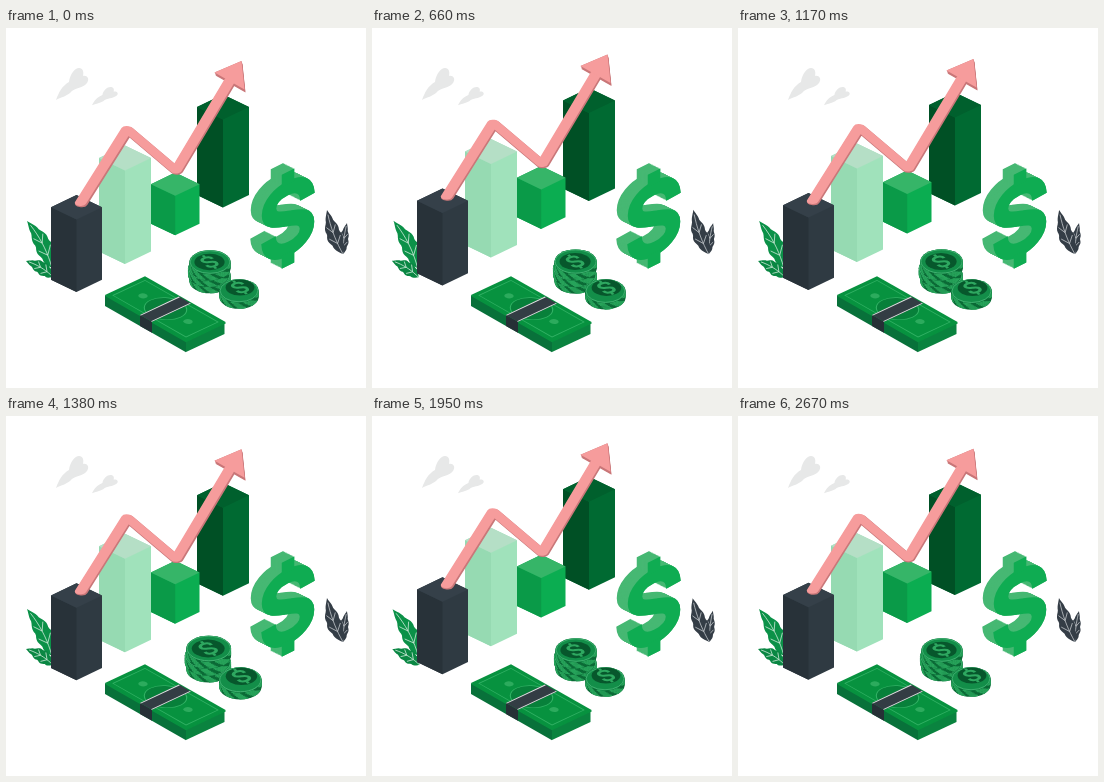
Animation of 360 by 360 pixels, one loop 2700 ms. Source, as an HTML page with a canvas:

```html
<!DOCTYPE html>
<html lang="en">
<head>
<meta charset="utf-8">
<title>Growth chart</title>
<style>
html, body { margin: 0; width: 100%; height: 100%; overflow: hidden; background: #fff; }
canvas { display: block; width: 360px; height: 360px; }
</style>
</head>
<body>
<canvas id="stage" width="360" height="360"></canvas>
<script>
const ctx = document.getElementById('stage').getContext('2d');
const LOOP = 2700, STEP = 30, TAU = Math.PI * 2;

// ---- drawing helpers ----
function fill(color, path) {
  ctx.fillStyle = color;
  ctx.fill(path);
}
function line(color, width, path) {
  ctx.strokeStyle = color;
  ctx.lineWidth = width;
  ctx.stroke(path);
}
function ellipse(x, y, rx, ry = rx, end = TAU) {
  const path = new Path2D();
  path.ellipse(x, y, rx, ry, 0, 0, end);
  return path;
}
function saved(change, draw) {
  ctx.save();
  change();
  draw();
  ctx.restore();
}
function around(x, y, change, draw) {
  saved(() => { ctx.translate(x, y); change(); ctx.translate(-x, -y); }, draw);
}
// Repeats a drawing along a vector, ending at the origin, to give it depth.
function extrude(dx, dy, draw) {
  const steps = Math.ceil(Math.hypot(dx, dy));
  for (let i = steps; i >= 0; i--)
    saved(() => ctx.translate(dx * i / steps, dy * i / steps), draw);
}

// ---- motion ----
const triangle = p => 1 - Math.abs(2 * (p % 1) - 1);
const floatOffset = t => 0.3 - 7.2 * triangle((t - 30 + LOOP) / 1350);
// Two beats per loop: a quick swell, then a fall.
const pulse = (p, peak, end) => Math.max(0, Math.min(1 - (peak - p) / .1, 1 - (p - peak) / (end - peak)));
const beatScale = p => 1 + .1 * (pulse(p, .1, .3) + pulse(p, .5, .6));
const swayAngle = p => (2 * triangle(p + .25) - 1) * Math.PI / 180;

// ---- clouds and plants ----
const CLOUD = new Path2D('M0 32 C3 24 6 18 13 14 C14 6 19 0 23 0 C27 0 28 4 27 8 C31 7 34 11 31 15 C26 21 19 19 14 25 C9 29 5 29 0 32Z');

function cloud(x, y, sx, sy) {
  saved(() => { ctx.translate(x, y); ctx.scale(sx, sy); }, () => fill('#e7e8e8', CLOUD));
}

function leaf(color, veinColor, bx, by, tx, ty, width, bend) {
  const dx = tx - bx, dy = ty - by, len = Math.hypot(dx, dy);
  const at = (u, side) => {
    const lobe = .8 + .2 * Math.abs(Math.sin(u * Math.PI * 4));
    const off = bend * 4 * u * (1 - u) + side * width * lobe * Math.sin(Math.PI * u ** .8);
    return [bx + dx * u - dy / len * off, by + dy * u + dx / len * off];
  };
  const outline = new Path2D(), veins = new Path2D();
  for (let u = 0; u <= 1; u += .04) outline.lineTo(...at(u, 1));
  for (let u = 1; u >= 0; u -= .04) outline.lineTo(...at(u, -1));
  for (let u = 0; u < .9; u += .1) veins.lineTo(...at(u, 0));
  for (const u of [.25, .5]) {
    veins.moveTo(...at(u, 0));
    veins.lineTo(...at(u + .15, -.75));
    veins.moveTo(...at(u, 0));
    veins.lineTo(...at(u + .15, .75));
  }
  fill(color, outline);
  line(veinColor, .8, veins);
}

function leftPlant() {
  leaf('#0b9148', '#cfeada', 46, 240, 21, 193, 9, 3);
  leaf('#0a8743', '#cfeada', 47, 249, 20, 233, 7, 2);
}
function rightPlant() {
  leaf('#343d46', '#c3c7cb', 337, 226, 341, 195, 5, -1);
  leaf('#343d46', '#c3c7cb', 337, 226, 321, 182, 8, -2);
}

// ---- chart ----
// Block centred on x: the silhouette first, so the faces join without gaps.
function bar(x, half, top, height, [left, right, lid]) {
  const drop = half * .48, side = top + drop, front = side + drop;
  fill(right, new Path2D(`M${x - half} ${side} L${x} ${top} L${x + half} ${side} v${height} L${x} ${front + height} L${x - half} ${side + height}Z`));
  fill(left, new Path2D(`M${x - half} ${side} L${x} ${front} v${height} L${x - half} ${side + height}Z`));
  fill(lid, new Path2D(`M${x - half} ${side} L${x} ${top} L${x + half} ${side} L${x} ${front}Z`));
}

const TREND = new Path2D('M74.5 350 L121 202 L170 285 L224 104');
const HEAD = new Path2D('M235.5 33 L208.5 44.5 L238.5 61.5Z');

function trendLine(color, width, dx, dy) {
  saved(() => { ctx.translate(dx, dy); ctx.scale(1, .5); ctx.lineJoin = ctx.lineCap = 'round'; },
    () => line(color, width, TREND));
}

function chart() {
  bar(217, 26, 66.5, 88, ['#005025', '#006a32', '#00602d']);
  bar(169.2, 24.3, 144.5, 39.5, ['#0a9a48', '#0bad51', '#36b568']);
  bar(119, 26, 117.5, 93.5, ['#96dab2', '#a0e2bb', '#b5dfc6']);
  bar(70.5, 25.5, 167, 72.5, ['#283239', '#2f3a42', '#354049']);

  const pink = '#f69c9c', shade = '#c97779';
  trendLine(shade, 12.5, .8, 1);
  extrude(1, 3, () => fill(shade, HEAD));
  trendLine(pink, 11.5, 0, 0);
  fill(pink, HEAD);
}

// ---- dollar sign ----
const DOLLAR = new Path2D('M19.5 -12 C19 -24 11 -30.5 0 -30.5 C-11 -30.5 -19 -25 -19 -16 C-19 -6 -9 -3 0 0 C9 3 19 6 19 16 C19 25 11 30.5 0 30.5 C-11 30.5 -19 24 -19.5 12');
const STUBS = new Path2D('M0 -47 V-34 M0 34 V47');

function dollarFace(color) {
  saved(() => ctx.transform(1, -.5, 0, 1, 282, 190.5), () => {
    line(color, 14.5, DOLLAR);
    line(color, 12.5, STUBS);
  });
}
function dollar() {
  extrude(-11, -5.5, () => dollarFace('#46b873'));
  dollarFace('#0fac52');
}

// ---- money ----
function money() {
  const w = 40, l = 81, depth = 11;
  const onNote = draw => saved(() => ctx.transform(1, -.47, 1, .57, 99, 267), draw);
  const rect = (color, ...box) => { ctx.fillStyle = color; ctx.fillRect(...box); };
  const leftSide = (color, from, to) => saved(() => ctx.transform(1, .57, 0, 1, 99, 267),
    () => rect(color, from, 0, to - from, depth));

  leftSide('#08713a', 0, l);
  saved(() => ctx.transform(1, -.47, 0, 1, 180, 313), () => rect('#0a833f', 0, 0, 38.5, depth));
  extrude(0, 1, () => onNote(() => rect('#07923f', 0, 0, w, l)));
  onNote(() => {
    ctx.strokeStyle = '#32b265';
    ctx.lineWidth = .8;
    ctx.strokeRect(4, 4, w - 8, l - 8);
    const seal = ellipse(w / 2, l / 2, 15);
    fill('#07803a', seal);
    line('#32b265', .8, seal);
    for (const v of [18, l - 18]) fill('#2cab5d', ellipse(w / 2, v, 3.3));
  });
  leftSide('#263036', 35, 47);
  onNote(() => {
    rect('#333d44', 0, 35, w - 1, 12);
    for (const v of [35, 46]) rect('#dfe6e2', 0, v, w - 1, .9);
  });
}

// ---- coins ----
function coin(x, y, rx, ry, depth) {
  extrude(0, depth, () => fill('#0b6a36', ellipse(x, y, rx, ry)));
  saved(() => ctx.setLineDash([8, 5]), () => {
    for (let i = 1; i < depth; i++) {
      ctx.lineDashOffset = i * 1.5;
      line('#27a35a', 1.2, ellipse(x, y + i, rx - .5, ry, Math.PI));
    }
  });
  fill('#138e49', ellipse(x, y, rx, ry));
  line('#4ab778', .8, ellipse(x, y, rx - .6, ry - .5));
}

function stack(x, y, rx, ry, count) {
  const depth = 6.5;
  for (let i = count - 1; i >= 0; i--) coin(x + (i % 2 ? -1 : .5), y + i * depth, rx - .5, ry, depth);
  fill('#07572c', ellipse(x, y, rx * .72, ry * .7));
  saved(() => { ctx.translate(x, y); ctx.transform(.24, -.08, .14, .14, 0, 0); }, () => {
    line('#2ea860', 12, DOLLAR);
    line('#2ea860', 10, STUBS);
  });
}

function coins() {
  stack(203.5, 234, 21, 11.8, 3);
  stack(234, 259.5, 20, 11.5, 1.5);
}

// ---- scene ----
function render(t) {
  const p = t / LOOP;
  const sway = () => ctx.rotate(swayAngle(p));
  const beat = () => ctx.scale(beatScale(p), beatScale(p));
  ctx.fillStyle = '#fff';
  ctx.fillRect(0, 0, 360, 360);
  cloud(50, 40, 1, 1);
  cloud(86, 59, .8, .57);
  around(32, 221, sway, leftPlant);
  around(331, 204, sway, rightPlant);
  saved(() => ctx.translate(0, floatOffset(t)), chart);
  dollar();
  money();
  around(218, 251, beat, coins);
}

const start = performance.now();
function tick() {
  const elapsed = performance.now() - start;
  render(Math.floor(elapsed / STEP) * STEP % LOOP);
  requestAnimationFrame(tick);
}
tick();
</script>
</body>
</html>
```
